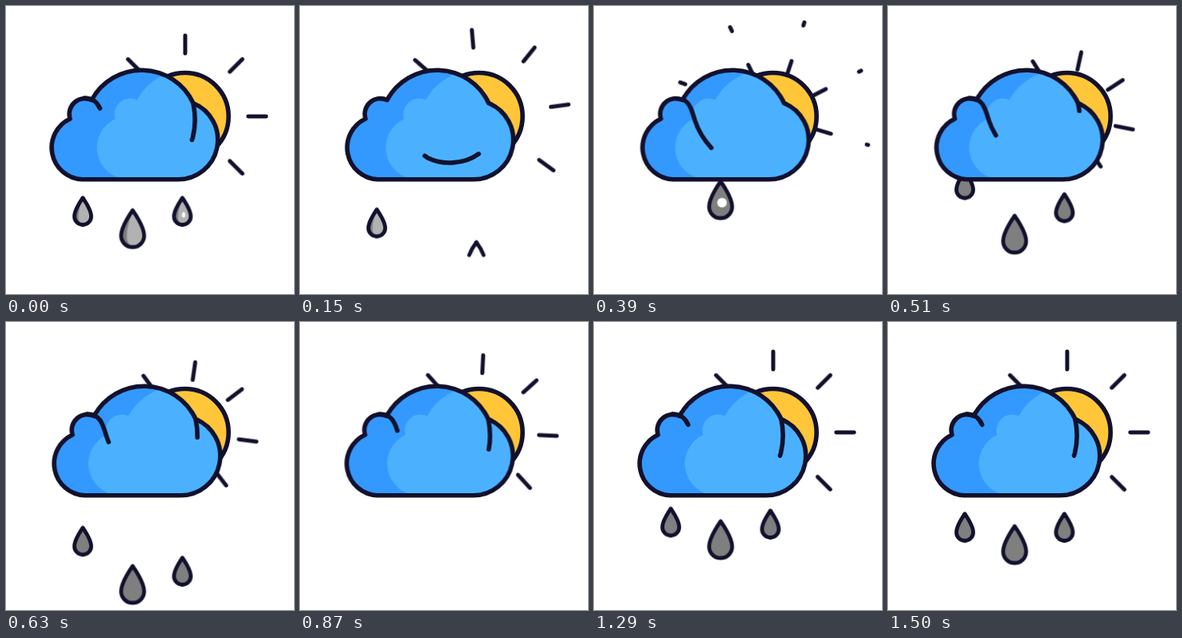
An HTML page that plays this animation: 360 px wide and 360 px high, repeating every 1530 ms.

```html
<!DOCTYPE html>
<html lang="en">
<head>
<meta charset="utf-8">
<title>Weather icon</title>
<style>
  html, body { margin: 0; width: 100%; height: 100%; overflow: hidden; background: #fff; }
  svg { display: block; width: 100vw; height: 100vh; }
  .line { fill: none; stroke: #12112d; stroke-width: 5.6; stroke-linecap: round; stroke-linejoin: round; }
  .ray { stroke-width: 4.8; stroke-dasharray: 22.5 46.5; }
  .late { stroke-dasharray: 22.5 200; }
  .sun { fill: #ffc63a; }
  .curl { stroke-dasharray: 74 169; }
  .half { stroke-width: 4.8; stroke-dasharray: 1 2; }
</style>
</head>
<body>
<svg viewBox="0 0 360 360">
  <defs>
    <path id="shape" d="M95 216.8A39.8 39.8 0 0 1 80 141A19.5 19.5 0 0 1 107 117.5A71 71 0 0 1 234 121.5A49.5 49.5 0 0 1 214.5 216.8Z"/>
    <clipPath id="inside"><use href="#shape"/></clipPath>
  </defs>
  <g id="rays" transform="translate(224 138)"></g>
  <circle class="line sun" cx="223.7" cy="138" r="54.5"/>
  <g id="drops"></g>
  <g id="cloud">
    <use href="#shape" fill="#3399ff"/>
    <g clip-path="url(#inside)">
      <g id="light"><use href="#shape" x="56.5" fill="#4bb1ff"/></g>
    </g>
    <use href="#shape" class="line"/>
    <path id="curl" class="line curl" pathLength="243"
      d="M234 121.5C237 136 237 150 233.5 164C231 172 229 177 225 182C206 199 176 199 158 190C142 180 128 160 122.5 143C118 128 115 115 98 115"/>
  </g>
</svg>
<script>
const LOOP = 1530, GLIDE = 1300;
const $ = id => document.getElementById(id);

function add(parent, tag, attrs = {}) {
  const el = document.createElementNS('http://www.w3.org/2000/svg', tag);
  for (const name in attrs) el.setAttribute(name, attrs[name]);
  return parent.appendChild(el);
}

// Each key is [ms, style, easing towards the next key].
function run(el, keys) {
  const frames = keys.map(([ms, style, easing = 'linear']) => ({ offset: ms / LOOP, easing, ...style }));
  el.animate(frames, { duration: LOOP, iterations: Infinity });
}

const glide = (el, from, to, easing, delay = 0) =>
  run(el, [[0, from], [delay, from, easing], [delay + GLIDE, to], [LOOP, to]]);
const dash = n => ({ strokeDashoffset: `${n}px` });
const move = (x, y) => ({ transform: `translate(${x}px, ${y}px)` });
const turn = deg => ({ transform: `rotate(${deg}deg)` });
const alpha = opacity => ({ opacity });

// Sun rays slide outwards, wrap round and turn by one eighth.
const rayEase = 'cubic-bezier(.164, 0, .118, 1)';

function makeRay(angle, slide, spinDelay, slideDelay, kind = '') {
  const ray = add($('rays'), 'line', { class: `line ray ${kind}`, x1: 55, x2: 124 });
  glide(ray, dash(slide), dash(slide - 69), rayEase, slideDelay);
  glide(ray, turn(angle), turn(angle - 45), rayEase, spinDelay);
}
for (let i = 0; i < 5; i++) makeRay(45 - 45 * i, -23.7, 14 * i, 14 * i);
// The lowest ray only grows out of the sun.
makeRay(90, 45.3, 0, 120, 'late');

// Cloud sway, its lit side and the travelling fold.
function sway(el, x) {
  run(el, [[0, move(0, 0), 'cubic-bezier(.36, .55, .64, 1)'], [430, move(x, 0), 'ease-in-out'],
    [1200, move(0, 0)], [LOOP, move(0, 0)]]);
}
sway($('cloud'), 3.6);
sway($('light'), -16);
glide($('curl'), dash(26.5), dash(-216.5), 'cubic-bezier(.163, .4, .086, 1)');

// Rain: a drop falls, is erased from the bottom up, then starts again behind the cloud.
const settle = 'cubic-bezier(.215, .61, .355, 1)';

function makeDrop({ x, size, fall, cuts }) {
  const drop = add($('drops'), 'g');
  const r = 10.5 * size, waist = 3 + 23 * size, foot = waist + r;
  const half = side => `M0 3C0 3 ${side * r} ${3 + 14 * size} ${side * r} ${waist}` +
    `A${r} ${r} 0 0 ${side > 0 ? 1 : 0} 0 ${foot}`;
  const body = add(drop, 'g');
  add(body, 'path', { d: half(1) + half(-1), fill: '#7f7f7f' });
  const shine = add(body, 'path', { d: half(1) + half(-.5), fill: '#b2b2b2' });
  const cutKeys = [[0, dash(0)]], bodyKeys = [[0, alpha(1)]];
  for (const [from, to] of cuts) {
    cutKeys.push([from, dash(0)], [to, dash(1.1)], [to, dash(0)]);
    const gone = from + (to - from) * .4;
    bodyKeys.push([gone, alpha(1)], [gone, alpha(0)], [to, alpha(0)], [to, alpha(1)]);
  }
  cutKeys.push([LOOP, dash(0)]);
  bodyKeys.push([LOOP, alpha(1)]);
  run(body, bodyKeys);
  run(shine, [[0, alpha(1)], [300, alpha(1)], [300, alpha(0)], [LOOP, alpha(0)]]);
  for (const side of [1, -1]) {
    run(add(drop, 'path', { class: 'line half', d: half(side), pathLength: 1 }), cutKeys);
  }
  run(drop, fall.map(([ms, y, easing]) => [ms, move(x, y), easing]));
  return body;
}

function glint(body, attrs, from, to) {
  const spot = add(body, 'ellipse', { fill: '#fff', ...attrs });
  run(spot, [[0, alpha(0)], [from, alpha(0)], [from, alpha(1)], [to, alpha(1)], [to, alpha(0)], [LOOP, alpha(0)]]);
}

makeDrop({
  x: 96, size: 1, cuts: [[200, 290], [710, 790]],
  fall: [[0, 237, 'ease-in'], [290, 280], [290, 165], [420, 165], [630, 254], [790, 312],
    [790, 165], [988, 165, settle], [LOOP, 237]]
});
const middle = makeDrop({
  x: 158.3, size: 1.37, cuts: [[50, 140], [645, 730]],
  fall: [[0, 252.5, 'ease-in'], [140, 300], [140, 160], [255, 160], [390, 216], [630, 302], [730, 325],
    [730, 160], [920, 160, settle], [LOOP, 252.5]]
});
const right = makeDrop({
  x: 220.5, size: 1, cuts: [[100, 200], [670, 750]],
  fall: [[0, 237, 'ease-in'], [200, 325], [200, 165], [375, 165], [630, 291.5], [750, 335],
    [750, 165], [870, 165, settle], [LOOP, 237]]
});
glint(middle, { cx: 1.7, cy: 29.5, rx: 6, ry: 6 }, 340, 450);
glint(middle, { cx: 1.5, cy: 25, rx: 3, ry: 5.5, transform: 'rotate(-28 1.5 25)' }, 1060, 1160);
glint(right, { cx: 1.5, cy: 24, rx: 2, ry: 3.5 }, 0, 45);
</script>
</body>
</html>
```
